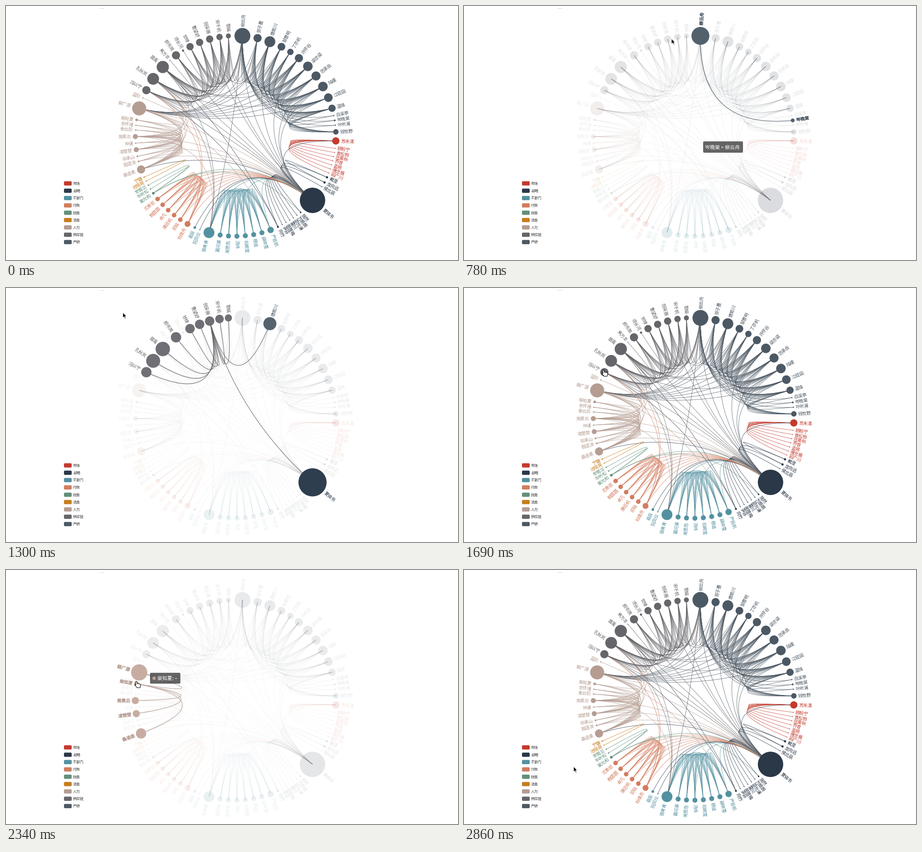
Write a matplotlib script that moves like this. It is 998 by 561 pixels and loops after 2.99 s.

```python
from itertools import combinations

import matplotlib.pyplot as plt
import numpy as np
from matplotlib.animation import FuncAnimation
from matplotlib.collections import PathCollection
from matplotlib.colors import to_rgb
from matplotlib.patches import Circle, FancyBboxPatch, Polygon, Rectangle
from matplotlib.patheffects import withStroke
from matplotlib.path import Path

W, H, DPI = 998, 561, 100
PT = 72 / DPI
CENTER = np.array([507.0, 287.0])
RADIUS = 221.5
FRAMES, STEP = 23, 130

plt.rcParams["font.family"] = ["Noto Sans CJK JP", "DejaVu Sans"]

# department: color, first and last angle (clockwise from the top), names, node radii
GROUPS = {
    "产研": ("#4c5964", 3.88, 87.67,
           "柳云舟 贺子墨 唐若川 邹景明 丁亦帆 许怀谷 梁亦梁 范承岳 陆缓 江砚田 温恪 "
           "白溪亭 岑晚棠 叶听澜 钱牧野",
           [17.5, 9, 12, 8.5, 7, 9, 10.5, 10, 10.5, 9.5, 8, 1.4, 2, 1.4, 6]),
    "市场": ("#c43a2d", 92.85, 111.7,
           "苏禾清 顾盼宁 袁松柏 庄素秋 乔音 孟朔 傅念薇 田广川",
           [8] + [1] * 7),
    "战略": ("#2a3848", 114.36, 155.06,
           "戴澄 龙向远 侯北辰 夏锦书 施然 万朗朗 邵允谦 雷川 苗腊梅 尹菲 向竹",
           [2.5, 2.5, 1, 28, 1.8, 1, 1, 1, 1, 1, 2.2]),
    "IT部门": ("#5391a0", 159.6, 204.0,
             "严启航 薛映雪 穆诚 石婉莹 汤炜 常思危 葛问渠 骆青青 阮凤仪 易辰",
             [7] + [5.5] * 6 + [12, 1.5, 3]),
    "行政": ("#d27c5e", 208.65, 231.06,
           "杜维舟 祁铭 康远帆 卓凡 鲍圆圆 尤泰岩",
           [6.5] + [5] * 5),
    "财务": ("#63907a", 235.16, 240.54, "崔允和 牛听松 安若兰", [3, 1.5, 1.5]),
    "法务": ("#c87d1e", 243.2, 245.75, "池晓荷 宁馥", [1.2, 1.5]),
    "人力": ("#b59d92", 250.5, 292.28,
           "桑语柔 殷逐浪 毕承山 凌楚楚 仲谨 简素云 季云阶 辛怀瑾 柴知夏 裴广源 蓝阶",
           [9, 2, 2, 5.5, 1.5, 5.5, 1.5, 1.5, 3, 15.5, 1.5]),
    "供应链": ("#65656a", 297.14, 355.86,
            "冯以宁 孔秋岚 盛禹 焦万丰 颜书简 项长河 甘棣 鲁望舒 倪采薇 宋千帆 黎婳",
            [9, 13, 13.5, 1, 9, 2.5, 8, 8, 8, 7, 5.5]),
}
LEGEND = ["市场", "战略", "IT部门", "行政", "财务", "法务", "人力", "供应链", "产研"]

names, radii, angles, colors = [], [], [], []
for color, first, last, people, sizes in GROUPS.values():
    # neighbours keep an equal gap between their rims
    pairs = np.add(sizes[:-1], sizes[1:])
    arc = np.radians(last - first) * RADIUS
    gap = (arc - pairs.sum()) / len(pairs)
    along = np.concatenate([[0], np.cumsum(pairs + gap)])
    angles += list(first + np.degrees(along / RADIUS))
    names += people.split()
    radii += sizes
    colors += [to_rgb(color)] * len(sizes)

radii, colors, angles = np.array(radii), np.array(colors), np.array(angles)
outward = np.c_[np.sin(np.radians(angles)), -np.cos(np.radians(angles))]
pos = CENTER + RADIUS * outward

# positions in the ring of the people who have many links
HEAD, BOSS = 0, 26
RED, IT_TOP, IT_HUB, ADMIN, MONEY = 15, 34, 41, 44, 50
SONG, LIN, JIAN, CHAI, PEI = 55, 58, 60, 63, 64
FENG, KONG, SHENG, YAN, NI = 66, 67, 68, 70, 74

edges = []


def link(a, others):
    edges.extend((a, b) for b in others)


def mesh(members):
    edges.extend(combinations(members, 2))


mesh(range(11))
link(14, [0, 2, 5, 6, 7, 8, 9, 10])
for small in (11, 12, 13):
    link(small, [HEAD, 10])
for p in (0, 1, 2, 3, 5, 6, 7, 8, 9):
    link(p, [PEI])
for p in (0, 2, 5, 7, 8):
    link(p, [BOSS])
link(RED, range(16, 23))
link(BOSS, [RED, 23, 24, 25, *range(27, 34), SONG])
link(23, [24])
link(33, [FENG, SHENG])
mesh(range(IT_TOP, IT_HUB + 1))
for p in (IT_TOP, 38, IT_HUB):
    link(p, [BOSS])
link(BOSS, [42, 43])
link(HEAD, [IT_HUB])
mesh(range(ADMIN, MONEY))
for p in range(ADMIN, MONEY):
    link(p, [BOSS])
link(ADMIN, [FENG, KONG])
link(MONEY, [51, 52, BOSS, 27])
link(54, [53])
mesh([SONG, LIN, JIAN, CHAI, PEI])
link(PEI, [56, 65, KONG, YAN, BOSS, IT_TOP])
link(56, [SONG, JIAN, BOSS])
for p in (57, 59, 61, 62):
    link(p, [SONG, LIN, JIAN])
link(JIAN, [FENG, KONG, IT_HUB, BOSS])
link(LIN, [SHENG, BOSS])
link(SONG, [FENG, KONG])
mesh([FENG, KONG, SHENG, YAN, 72, 73, NI, 75, 76])
link(69, [SHENG])
link(71, [73])
link(KONG, [0, 2, 8, IT_HUB, BOSS])
link(SHENG, [0, 5, 6, IT_HUB, BOSS])
link(FENG, [BOSS])
link(YAN, [0, BOSS])
link(72, [0])
link(NI, [2, BOSS])
link(75, [0, BOSS])
link(76, [0, 1])

edges = np.array(edges)
edge_colors = colors[edges[:, 0]]


def curve(a, b):
    control = 0.9 * CENTER + 0.05 * (pos[a] + pos[b])
    return Path([pos[a], control, pos[b]], [Path.MOVETO, Path.CURVE3, Path.CURVE3])


fig = plt.figure(figsize=(W / DPI, H / DPI), dpi=DPI, facecolor="white")
ax = fig.add_axes([0, 0, 1, 1])
ax.set_xlim(0, W)
ax.set_ylim(H, 0)
ax.axis("off")


def write(x, y, text, size, **style):
    return ax.text(x, y + 0.36 * size, text, fontsize=size * PT,
                   va="baseline", **style)


# legend and the faint mark at the top
for i, title in enumerate(LEGEND):
    y = 391.8 + 16.2 * i
    ax.add_patch(FancyBboxPatch((128, y - 4.7), 17, 9.4, lw=0, fc=GROUPS[title][0],
                                boxstyle="round,pad=0,rounding_size=2.2"))
    write(148, y, title, 8, color="#333333")
ax.plot([206, 216], [5, 5], color="#cccccc", lw=0.7, ls=(0, (3, 1)))

lines = PathCollection([curve(a, b) for a, b in edges], facecolors="none", zorder=2)
ax.add_collection(lines, autolim=False)
dots = ax.scatter(pos[:, 0], pos[:, 1], linewidths=0, zorder=3)

LABEL = 9.6
crop = Rectangle((0, 0), W, 541, transform=ax.transData)
right = angles < 180
turns = np.where(right, 90 - angles, 270 - angles)
below = np.c_[np.sin(np.radians(turns)), np.cos(np.radians(turns))]
labels = []
for i, name in enumerate(names):
    label = ax.text(0, 0, name, fontsize=LABEL * PT, rotation=turns[i],
                    rotation_mode="anchor", va="baseline",
                    ha="left" if right[i] else "right", zorder=4)
    label.set_clip_path(crop)
    labels.append(label)

tip_box = FancyBboxPatch((0, 0), 1, 1, lw=0, fc=(0.2, 0.2, 0.2, 0.76), zorder=6,
                         boxstyle="round,pad=0,rounding_size=2.5")
tip_dot = Circle((0, 0), 4, lw=0, zorder=7)
tip_text = write(0, 0, "", 11, color="white", zorder=7)
ARROW = np.array([(0, 0), (0, 12), (2.8, 9.5), (4.8, 14), (6.7, 13.2),
                  (4.7, 8.9), (8.3, 8.9)])
HAND = np.array([(0, 0), (1.8, 0.2), (2.6, 5), (5, 4.6), (6, 5.4), (8, 5.3),
                 (10, 6.6), (10.2, 10), (9, 14), (2.5, 14), (-0.5, 10.5),
                 (-3, 7.8), (-2, 6.5), (0, 8), (-1.2, 1)])
arrow = Polygon(ARROW, fc="black", ec="white", lw=0.7, zorder=9)
hand = Polygon(HAND, fc="white", ec="black", lw=0.8, zorder=9)
for artist in (tip_box, tip_dot, arrow, hand):
    ax.add_patch(artist)

# cursor path: time step, x, y
PATH = np.array([(1, 180, 500), (5, 508, 279), (6, 458, 72), (7, 453, 74),
                 (10, 258, 54), (12, 285, 140), (13, 307, 181), (14, 305, 184),
                 (15, 295, 228), (17, 295, 228), (18, 287, 246), (20, 242, 434),
                 (22, 242, 434)])
HAND_STEPS = {7, 13, 14, 15, 16, 17, 18}
HOVERED = {7: NI, 14: FENG, 15: PEI, 16: PEI, 17: PEI, 18: CHAI}
LEVELS = {6: 0.94, 11: 0.5, 20: 0.94, 21: 0.5}


def focus_of(n):
    """Masks of the highlighted nodes and edges, and how far the rest has faded."""
    node_on = np.zeros(len(names), bool)
    edge_on = np.zeros(len(edges), bool)
    if n == 6:
        edge_on = (edges == (12, HEAD)).all(axis=1)
    elif 7 <= n <= 11:
        edge_on = (edges == NI).any(axis=1)
    elif n == 14:
        edge_on = (edges == FENG).any(axis=1)
    elif 15 <= n <= 17:
        edge_on = (edges == PEI).any(axis=1)
    elif 18 <= n <= 21:
        edge_on = (edges == CHAI).any(axis=1)
    node_on[edges[edge_on].ravel()] = True
    return node_on, edge_on, LEVELS.get(n, float(edge_on.any()))


def show_tip(n, x, y):
    visible = n == 6 or n in HOVERED
    for artist in (tip_box, tip_text, tip_dot):
        artist.set_visible(visible)
    if n == 6:
        tip_dot.set_visible(False)
        tip_box.set_bounds(528, 299, 88, 25)
        tip_text.set_text(f"{names[12]} > {names[HEAD]}")
        tip_text.set_position((532, 311.3 + 4))
    elif visible:
        who = HOVERED[n]
        left, top = x + 31, y - 19
        tip_box.set_bounds(left, top, 34 + 11 * len(names[who]), 24)
        tip_dot.center = (left + 9, top + 12)
        tip_dot.set_facecolor(colors[who])
        tip_text.set_text(f"{names[who]}: –")
        tip_text.set_position((left + 16, top + 16))


def draw(n):
    node_on, edge_on, level = focus_of(n)

    alpha = np.where(edge_on, 0.85, 0.8 - 0.75 * level)
    lines.set_edgecolor(np.c_[edge_colors, alpha])
    lines.set_linewidth(np.where(edge_on, 0.9 + 0.35 * level, 0.9) * PT)

    lift = np.where(node_on, 1 + 0.1 * level, 1)[:, None]
    shade = np.minimum(colors * lift, 1)
    grown = np.maximum(radii * 1.11, radii + 2.4)
    size = np.where(node_on, radii + (grown - radii) * level, radii)
    alpha = np.where(node_on, 1, 1 - 0.88 * level)
    dots.set_sizes((2 * size * PT) ** 2)
    dots.set_facecolor(np.c_[shade, alpha])

    spots = pos + outward * (size + 3.3)[:, None] + below * 0.36 * LABEL
    heavy = n == 6 or n >= 18
    for i, label in enumerate(labels):
        label.set_position(spots[i])
        label.set_color((*colors[i], alpha[i]))
        bold = heavy and node_on[i]
        label.set_path_effects(
            [withStroke(linewidth=0.4, foreground=colors[i])] if bold else [])

    x, y = (np.interp(n, PATH[:, 0], PATH[:, k]) for k in (1, 2))
    arrow.set_xy(ARROW + (x, y))
    hand.set_xy(HAND + (x, y))
    arrow.set_visible(n > 0 and n not in HAND_STEPS)
    hand.set_visible(n in HAND_STEPS)
    show_tip(n, x, y)
    return []


anim = FuncAnimation(fig, draw, frames=FRAMES, interval=STEP, repeat=True,
                     repeat_delay=0, init_func=lambda: [], blit=False)
plt.show()
```
